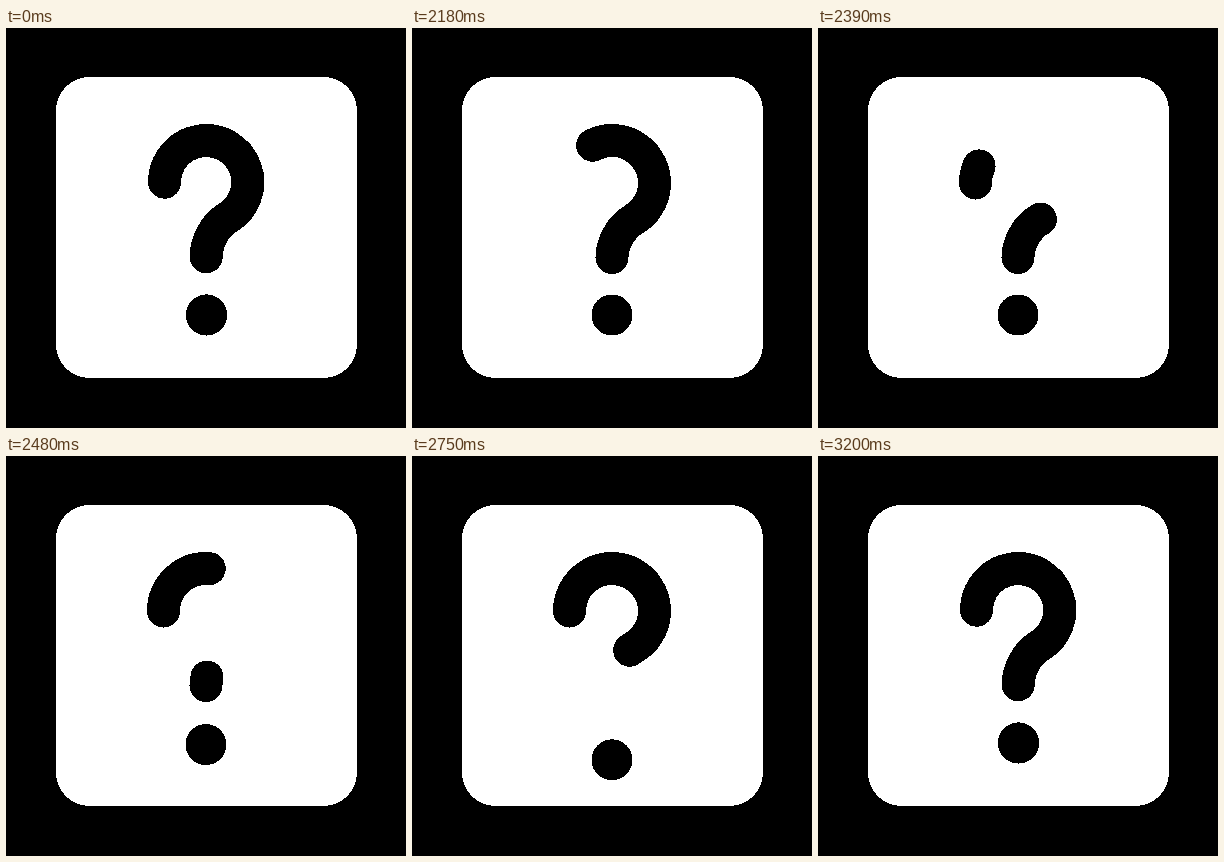
Animation of 400 by 400 pixels, one loop 3230 ms. Source, as an HTML page:

```html
<!DOCTYPE html>
<html lang="en">
<head>
<meta charset="utf-8">
<title>Question mark</title>
<style>
  html, body { margin: 0; height: 100%; overflow: hidden; background: #000; }
  svg { display: block; width: 100vw; height: 100vh; }
  path { fill: none; stroke: #000; stroke-width: 33; stroke-linecap: round; }
</style>
</head>
<body>
<svg viewBox="0 0 400 400" shape-rendering="crispEdges">
  <rect x="50" y="49" width="301" height="301" rx="33.5" fill="#fff"/>
  <path id="still" d="M158.6 154.2A41.6 41.6 0 1 1 221 190.2C209.2 197.2 200.2 213.8 200.2 228.8"/>
  <path id="leaving" pathLength="1"/>
  <path id="entering" pathLength="1" d="M157.5 155A42.5 42.5 0 1 1 221.3 191.8C209.5 198.6 200 214.8 200 229.5"/>
  <circle id="dot"/>
</svg>
<script>
const LOOP = 3230, START = 2030, END = 3200, STEP = 30;
const [still, leaving, entering, dot] =
  ['still', 'leaving', 'entering', 'dot'].map(id => document.getElementById(id));
leaving.setAttribute('d', entering.getAttribute('d'));

// Ease with flat ends; x1 and x2 are the horizontal handle positions.
function ease(x, x1 = 1 / 3, x2 = 2 / 3) {
  if (x <= 0) return 0;
  if (x >= 1) return 1;
  let lo = 0, hi = 1;
  for (let i = 0; i < 24; i++) {
    const t = (lo + hi) / 2, r = 1 - t;
    if (3 * x1 * t * r * r + 3 * x2 * t * t * r + t ** 3 < x) lo = t; else hi = t;
  }
  return lo * lo * (3 - 2 * lo);
}

const show = (el, on) => el.style.display = on ? '' : 'none';

function trim(path, from, to) {
  show(path, to > from);
  path.setAttribute('stroke-dasharray', `${to - from} 2`);
  path.setAttribute('stroke-dashoffset', -from);
}

function place(x, y, r) {
  dot.setAttribute('cx', x);
  dot.setAttribute('cy', y);
  dot.setAttribute('r', r);
}

function draw(ms) {
  const moving = ms >= START && ms < END;
  show(still, !moving);
  if (moving) {
    const k = Math.floor((ms - START) / STEP);
    trim(leaving, ease(k / 17), 1);
    trim(entering, 0, ease((k - 9) / 30, .23, .18));
    place(200, 287 + 21 * (ease((k - 14) / 6) - ease((k - 20) / 14)), 20.5);
  } else {
    show(leaving, false);
    show(entering, false);
    place(200.5, 287, 20.6);
  }
}

const origin = performance.now();
function tick() {
  draw((performance.now() - origin) % LOOP);
  requestAnimationFrame(tick);
}
tick();
</script>
</body>
</html>
```
